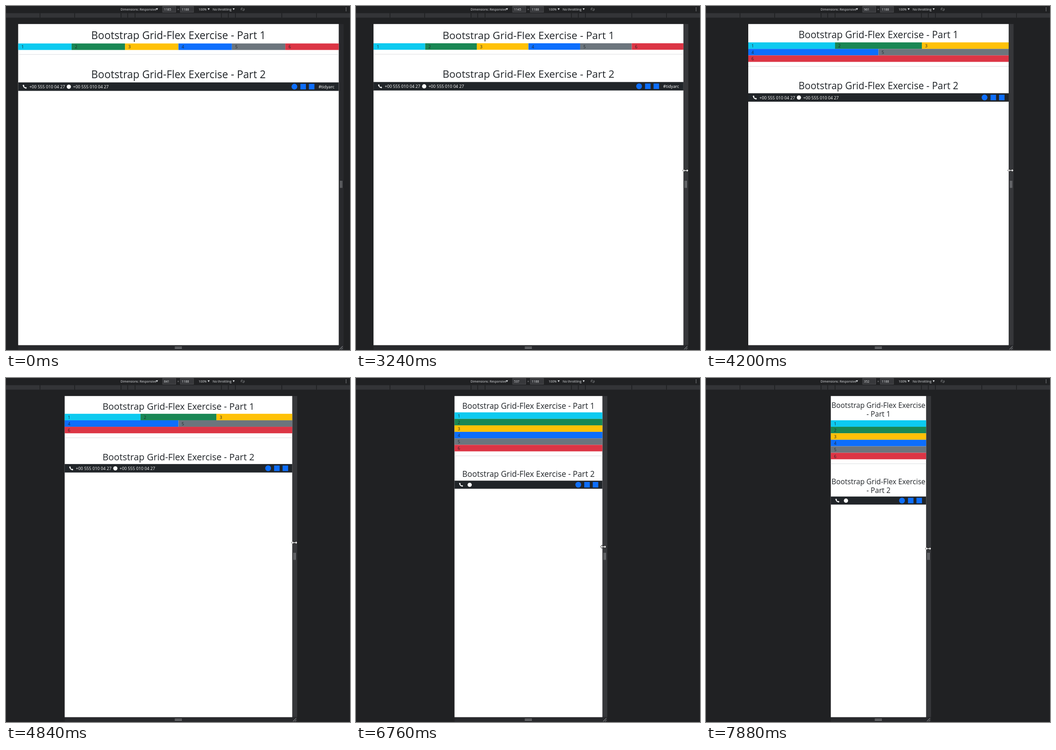
These frames come from a looping animation (749 px wide and 748 px high, 8000 ms). An HTML page with a canvas:

```html
<!DOCTYPE html>
<html lang="en">
<head>
<meta charset="utf-8">
<title>Responsive grid resize</title>
<style>
  html, body { margin: 0; width: 100%; height: 100%; overflow: hidden; background: #202123; }
  canvas { display: block; }
</style>
</head>
<body>
<canvas id="stage" width="749" height="748"></canvas>
<script>
const ctx = document.getElementById('stage').getContext('2d');
const LOOP = 8000, STEP = 160;
const S = 0.589;            // stage pixels per CSS pixel of the viewport
const MID = 375.5, TOP = 39.2, BOTTOM = 737.5;
const FONT = '"Open Sans", "Noto Sans", sans-serif';
const INK = '#212529', BLUE = '#0d6efd';
const COLORS = ['#0dcaf0', '#198754', '#ffc107', BLUE, '#6c757d', '#dc3545'];
const TITLE = 'Bootstrap Grid-Flex Exercise - Part ';
const PHONE = '+00 555 010 04 27', TAG = '#tidyarc';
const TITLE_EM = 16.22, PHONE_EM = 8.25;

// time, page width on stage, width shown in the toolbar
const SIZES = [
  [3080, 698, 1185], [3720, 605, 1026], [4200, 567, 961], [4840, 495.5, 841],
  [5320, 452, 765], [5640, 425, 718], [6440, 371, 626], [6760, 322, 537],
  [7560, 253, 428], [7880, 207.5, 352]
];
const ARROW = [
  [160, 541, 308], [1120, 397, 156], [1280, 450, 190], [1440, 570, 262],
  [1600, 690, 335], [1760, 737, 356]
];
const GRIP_Y = [[2090, 362], [2410, 359], [3720, 357], [4840, 358], [5640, 361], [6760, 367], [7880, 371]];

function track(keys, t, col) {
  if (t <= keys[0][0]) return keys[0][col];
  for (let i = 1; i < keys.length; i++) {
    const a = keys[i - 1], b = keys[i];
    if (t <= b[0]) return a[col] + (b[col] - a[col]) * (t - a[0]) / (b[0] - a[0]);
  }
  return keys[keys.length - 1][col];
}

function stepped(t) {
  const start = t < 2090 ? 0 : t < 3240 ? 2090 : 3240;
  const last = t < 2090 ? 1760 : t < 3240 ? 2410 : 7880;
  return Math.min(last, start + Math.floor((t - start) / STEP) * STEP);
}

function emWidth(str, weight) {
  ctx.font = `${weight} 100px ${FONT}`;
  return ctx.measureText(str).width / 100;
}
const HEAD_K = TITLE_EM / emWidth(TITLE + 1, 500);
const BODY_K = PHONE_EM / emWidth(PHONE, 400);

function rect(x, y, w, h, color) {
  ctx.fillStyle = color;
  ctx.fillRect(x, y, w, h);
}

function text(str, x, y, size, color, align = 'left', weight = 400) {
  const k = weight === 500 ? HEAD_K : BODY_K;
  ctx.font = `${weight} ${size * k}px ${FONT}`;
  ctx.textAlign = align;
  ctx.fillStyle = color;
  ctx.fillText(str, x, y);
}

function poly(points, fill, stroke) {
  ctx.beginPath();
  points.forEach(([x, y]) => ctx.lineTo(x, y));
  ctx.closePath();
  if (stroke) {
    ctx.strokeStyle = stroke;
    ctx.lineWidth = 1.2;
    ctx.stroke();
  }
  ctx.fillStyle = fill;
  ctx.fill();
}

function line(x1, y1, x2, y2, color, width = 1) {
  ctx.strokeStyle = color;
  ctx.lineWidth = width;
  ctx.beginPath();
  ctx.moveTo(x1, y1);
  ctx.lineTo(x2, y2);
  ctx.stroke();
}

function disc(x, y, r, color) {
  ctx.fillStyle = color;
  ctx.beginPath();
  ctx.arc(x, y, r, 0, Math.PI * 2);
  ctx.fill();
}

function toolbar(shown) {
  const size = 12 * S, base = 9.8, color = '#e0e2e5';
  const caret = x => poly([[x - 2.2, 5], [x + 2.2, 5], [x, 9]], color);
  const field = (x, w, value) => {
    rect(x, 0.5, w, 13.5, '#5a5b5e');
    rect(x + 0.6, 1.1, w - 1.2, 12.3, '#37383b');
    text(value, x + 3.3, base, size, color);
  };
  text('Dimensions: Responsive', 249.5, base, size, color);
  caret(328.7);
  field(340.7, 29.3, shown);
  text('×', 375, base + 0.5, size, '#a5a7aa', 'center');
  field(379.3, 29.3, 1188);
  text('100%', 419.3, base, size, color);
  caret(441.2);
  text('No throttling', 450, base, size, color);
  caret(495.7);

  ctx.save();
  ctx.translate(515.3, 7.2);
  ctx.rotate(-Math.PI / 4);
  ctx.strokeStyle = '#85878a';
  ctx.lineWidth = 0.8;
  ctx.strokeRect(-1.4, -2.7, 2.8, 5.4);
  for (const a of [0, Math.PI]) {
    ctx.beginPath();
    ctx.arc(0, 0, 3.8, a + 0.2, a + 2);
    ctx.stroke();
  }
  ctx.restore();
  for (const y of [4.2, 7.2, 10.2]) disc(740.5, y, 0.8, '#c5c7ca');

  rect(0, 15.6, 749, 9.8, '#333437');
  for (const x of [74, 149.5, 250.5, 265, 281, 469, 484, 499.5, 600.5, 676]) {
    rect(x - 0.6, 15.6, 1.2, 9.8, '#18191b');
  }
}

function handles(left, right, active) {
  rect(right, TOP, 10.7, BOTTOM - TOP, active ? '#36373a' : '#28292c');
  rect(left, BOTTOM, right - left + 10.7, 748 - BOTTOM, '#28292c');
  const x = right + 5.2, grey = '#b3b5b8';
  for (const d of [-1.5, 1.5]) line(x + d, 380, x + d, 395.5, grey);
  for (const y of [741.7, 744.5]) line(367.5, y, 383, y, grey);
  line(x - 3.5, 746.5, x + 3.5, 739.7, grey);
  line(x + 0.5, 746.5, x + 3.5, 743.5, grey);
}

// Draws a centred heading, returns the y below its margin.
function heading(n, y, w, size) {
  const lines = TITLE_EM * size > w
    ? ['Bootstrap Grid-Flex Exercise', '- Part ' + n]
    : [TITLE + n];
  for (const str of lines) {
    text(str, MID, y + size * 1.014, size, INK, 'center', 500);
    y += size * 1.2;
  }
  return y + 8 * S;
}

function rowsFor(css) {
  if (css >= 992) return [6];
  if (css >= 768) return [3, 2, 1];
  if (css >= 576) return [2, 1, 1, 1, 1];
  return [1, 1, 1, 1, 1, 1];
}

function handset(x, y) {
  ctx.strokeStyle = '#fff';
  ctx.lineWidth = 2;
  ctx.beginPath();
  ctx.moveTo(x - 3.1, y - 3);
  ctx.quadraticCurveTo(x - 2.5, y + 2.5, x + 3, y + 3.1);
  ctx.stroke();
  line(x - 3.8, y - 3.4, x - 1.6, y - 1.3, '#fff', 2.6);
  line(x + 1.3, y + 1.6, x + 3.6, y + 3.6, '#fff', 2.6);
}

function contactBar(left, right, y, css) {
  const h = css >= 576 ? 18.4 : 17.5;
  const cy = y + h / 2, base = cy + 4, size = 16 * S;
  const wide = css >= 768;
  rect(left, y, right - left, h, INK);
  handset(left + 14.3, cy);
  disc(left + (wide ? 110.3 : 33), cy + 0.2, 4.6, '#fff');
  if (wide) {
    text(PHONE, left + 24.3, base, size, '#fff');
    text(PHONE, left + 119.5, base, size, '#fff');
  }
  let edge = right;
  if (css >= 992) {
    text(TAG, right - 9.4, base, size, '#fff', 'right');
    edge -= 44;
  }
  disc(edge - 52.5, cy, 6.3, BLUE);
  rect(edge - 39.5, cy - 6, 12, 12, BLUE);
  rect(edge - 21, cy - 6, 12, 12, BLUE);
}

function page(w, css) {
  const left = MID - w / 2, right = MID + w / 2;
  const size = (22 + 0.015 * w / S) * S, rowH = 24 * S;
  rect(left, TOP, w, BOTTOM - TOP, '#fff');
  let y = heading(1, TOP + 16 * S, w, size), item = 0;
  for (const cols of rowsFor(css)) {
    for (let c = 0; c < cols; c++) {
      const x = left + w * c / cols;
      rect(x, y, w / cols, rowH, COLORS[item]);
      text(++item, x + 12 * S, y + 11, 16 * S, INK);
    }
    y += rowH;
  }
  y += 16 * S;
  rect(left, y - 0.2, w, 1, '#dcdde0');
  y = heading(2, y + 28.3, w, size);
  contactBar(left, right, y, css);
}

function arrow(x, y) {
  const shape = [[0, 0], [0, 9.6], [2.1, 7.7], [3.5, 10.9], [5, 10.3], [3.6, 7.2], [6.4, 7]];
  poly(shape.map(([a, b]) => [x + a, y + b]), '#fff', '#222');
}

function resizer(x, y) {
  const half = [[-6, 0], [-3, -3], [-3, -0.8], [3, -0.8], [3, -3]];
  const shape = half.concat(half.map(([a, b]) => [-a, -b]));
  poly(shape.map(([a, b]) => [x + a, y + b]), '#fff', '#222');
}

function draw(t) {
  const w = track(SIZES, t, 1), shown = Math.round(track(SIZES, t, 2));
  const dragging = t >= 2090;
  rect(0, 0, 749, 748, '#202123');
  toolbar(shown);
  handles(MID - w / 2, MID + w / 2, dragging);
  page(w, shown);
  if (dragging) resizer(MID + shown * S / 2 + 4.8, track(GRIP_Y, t, 1));
  else if (t >= STEP) arrow(track(ARROW, t, 1), track(ARROW, t, 2));
}

const begin = performance.now();
function tick() {
  draw(stepped((performance.now() - begin) % LOOP));
  requestAnimationFrame(tick);
}
tick();
</script>
</body>
</html>
```
